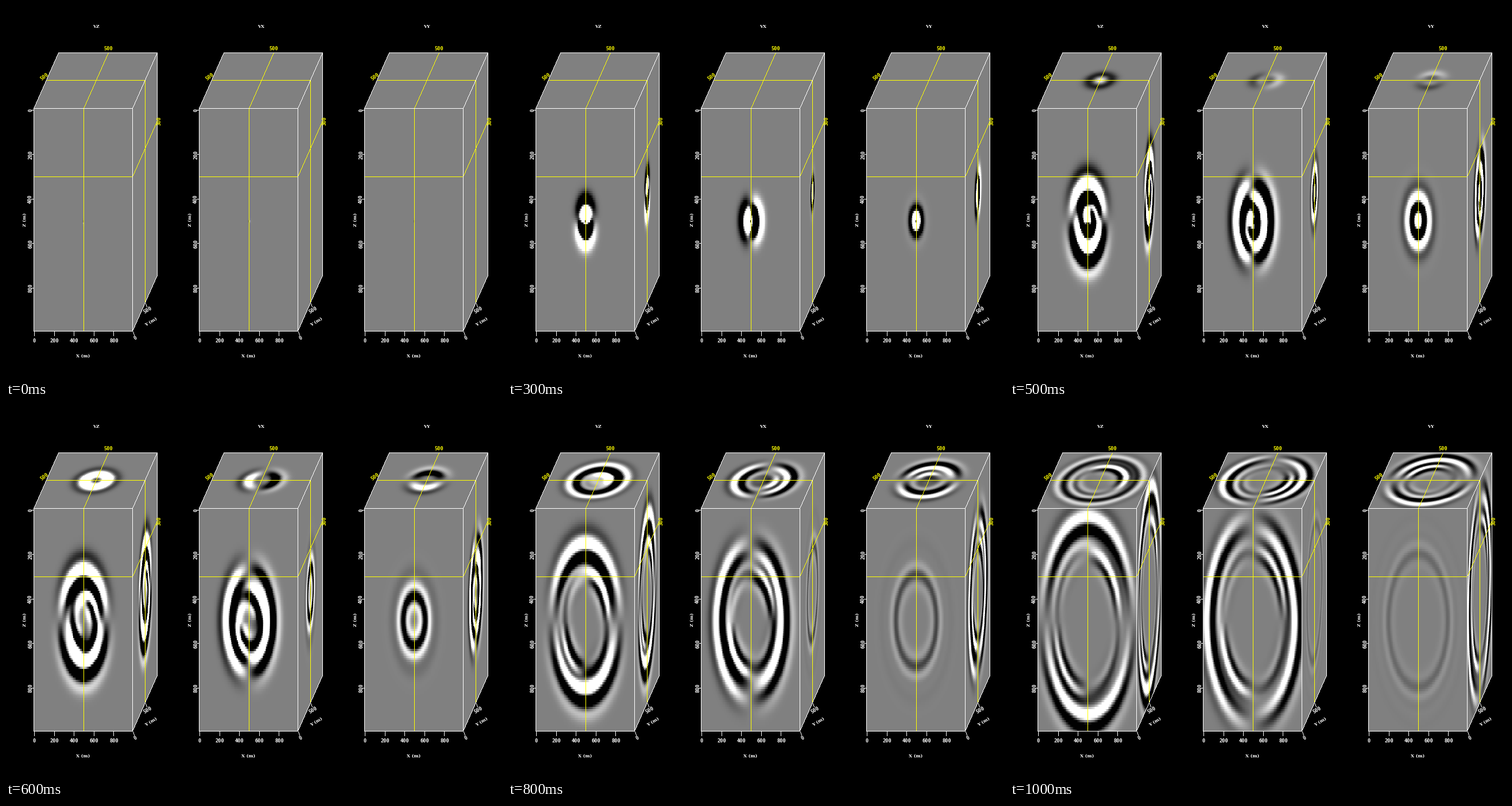
Animation, 864 px wide and 648 px high, one loop 1.1 s. Source, as a matplotlib script:

```python
import numpy as np
import matplotlib.pyplot as plt
from matplotlib.animation import FuncAnimation

W, H = 864, 648
STEPS, INTERVAL = 11, 100
PITCH = 288                      # distance between panels
X0, X1, Z0, Z1 = 48.5, 220.5, 179, 566.5
DX, DY = 43.5, 97.5              # receding edge of the cube
CELLS, CELL, SRC = 100, 10, 500
SLICE_Z = 300
WHITE, YELLOW = (1, 1, 1, 1), (1, 1, 0, 1)

fig = plt.figure(figsize=(W / 72, H / 72), dpi=72, facecolor="black")
ax = fig.add_axes([0, 0, 1, 1])
ax.set_xlim(0, W)
ax.set_ylim(H, 0)
ax.axis("off")


def snap(u):
    """Fraction along an edge to the coordinate of its grid cell."""
    return np.clip(np.floor(u * CELLS), 0, CELLS - 1) * CELL


def cube_points():
    """Pixels covered by the three faces, with the x, y, z each one shows."""
    py, px = np.mgrid[0:H, 0:PITCH]
    cx, cy = px + 0.5, py + 0.5
    u, v = (cx - X0) / (X1 - X0), (cy - Z0) / (Z1 - Z0)
    s_top = (Z0 - cy) / DY
    u_top = (cx - X0 - DX * s_top) / (X1 - X0)
    s_side = (cx - X1) / DX
    v_side = (cy - Z0 + DY * s_side) / (Z1 - Z0)

    def inside(a, b):
        return (a >= 0) & (a < 1) & (b >= 0) & (b < 1)

    front, top, side = inside(u, v), inside(u_top, s_top), inside(s_side, v_side)
    x = np.where(front, snap(u), np.where(top, snap(u_top), SRC))
    y = np.where(top, snap(s_top), np.where(side, snap(s_side), SRC))
    z = np.where(front, snap(v), np.where(side, snap(v_side), SLICE_Z))
    mask = front | top | side
    return mask, np.stack([x, y, z])[:, mask] - SRC


MASK, POINTS = cube_points()


def gauss3(x):
    """Third derivative of a Gaussian, sign flipped for an outgoing wave."""
    return (3 * x - x**3) * np.exp(-x * x / 2)


def gauss4(x):
    """Fourth derivative of a Gaussian."""
    return (x**4 - 6 * x**2 + 3) * np.exp(-x * x / 2)


def velocity(axis, step):
    """Velocity component: P front, S front and the near field between them."""
    d = POINTS.copy()
    d[axis] -= CELL / 2
    r = np.sqrt((d**2).sum(axis=0))
    g = d / r
    r_p = np.interp(step, [0, 2, 4, 6, 10], [-180, -58, 80, 208, 446])
    r_s = 46.5 * (step - 3.03)
    x_p, x_s = (r - r_p) / 40, (r - r_s) / 30

    gi = g[axis]
    p_wave = -560 * gi * gauss3(x_p) / r
    near = (220e3 * (1 - gi**2) * (gauss3(x_s) - 0.5 * gauss3(x_p))
            / (r**2 + 70**2) ** 1.25)
    cross = -gi * (g.sum(axis=0) - gi)
    cross = np.where(cross > 0, cross, 0.3 * cross)
    s_wave = 300 * cross * gauss4(x_s) / np.hypot(r, 60)
    return p_wave + near + s_wave


def render(step):
    img = np.zeros((H, W))
    for i, axis in enumerate((2, 0, 1)):
        panel = img[:, i * PITCH:(i + 1) * PITCH]
        panel[MASK] = 0.502 + 0.498 * np.clip(velocity(axis, step), -1, 1)
    return img


overlay = np.zeros((H, W, 4))


def line(dx, points, color=WHITE):
    """One-pixel polyline without smoothing."""
    for (xa, ya), (xb, yb) in zip(points, points[1:]):
        n = int(max(abs(xb - xa), abs(yb - ya))) + 1
        cols = np.rint(np.linspace(xa, xb, n) + dx).astype(int)
        rows = np.rint(np.linspace(ya, yb, n)).astype(int)
        overlay[rows, cols] = color


def text(x, y, s, font, size, color, rot):
    ax.text(x + 0.5, y + 0.5, s, color=color, rotation=rot, family=font,
            fontsize=size, weight="bold", ha="center",
            va="center" if rot else "center_baseline")


def number(x, y, n, color=WHITE, rot=0):
    text(x, y, str(n), "DejaVu Sans Mono", 8.6, color, rot)


def name(x, y, s, rot=0):
    text(x, y, s, "DejaVu Serif", 7.8, WHITE, rot)


def draw_frame(dx, title):
    # slice positions
    line(dx, [(48, 297), (220, 297), (263, 200)], YELLOW)
    line(dx, [(135, 566), (135, 178), (178, 81)], YELLOW)
    line(dx, [(70, 129), (242, 129), (242, 517)], YELLOW)

    # cube edges
    line(dx, [(48, 178), (220, 178), (220, 566), (48, 566), (48, 178),
              (91, 81), (263, 81), (263, 469), (220, 566)])
    line(dx, [(220, 178), (263, 81)])

    name(dx + 156, 34, title)
    number(dx + 178, 73, 500, YELLOW)
    number(dx + 67, 123, 500, YELLOW, 38)
    number(dx + 267, 200, 300, YELLOW, 90)

    for n in range(5):
        x, z = 49 + 34.6 * n, 181 + 77.4 * n
        line(dx, [(x, 567), (x, 574)])
        line(dx, [(44, z), (48, z)])
        number(dx + x, 582, 200 * n)
        number(dx + 42, z, 200 * n, rot=90)
    line(dx, [(221, 567), (223, 573)])
    line(dx, [(243, 518), (245, 524)])
    number(dx + 225, 578, 0, rot=31)
    number(dx + 246, 529, 500, rot=31)

    name(dx + 134, 608, "X (m)")
    name(dx + 32, 372, "Z (m)", 90)
    name(dx + 252, 550, "Y (m)", 31)


for i, title in enumerate(["VZ", "VX", "VY"]):
    draw_frame(i * PITCH, title)

stage = dict(aspect="auto", extent=(0, W, H, 0), interpolation="nearest")
field = ax.imshow(render(0), cmap="gray", vmin=0, vmax=1, **stage)
ax.imshow(overlay, **stage)


def update(step):
    field.set_data(render(step))
    return [field]


anim = FuncAnimation(fig, update, frames=STEPS, interval=INTERVAL,
                     repeat=True, repeat_delay=0, blit=False)
plt.show()
```
